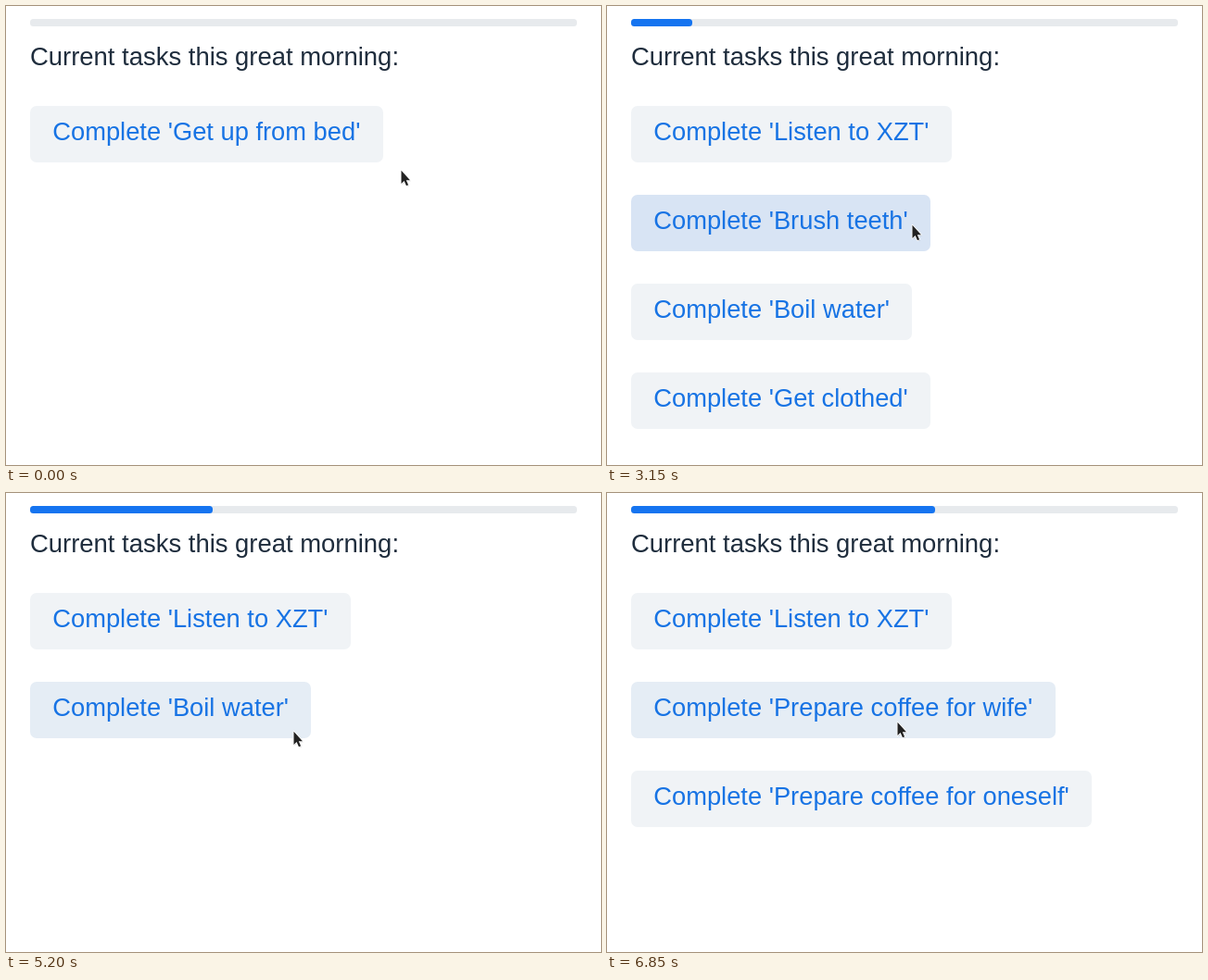
Recreate the animation shown at these times as an HTML page. Size 642 by 496 pixels, loop 8000 ms.

```html
<!DOCTYPE html>
<html lang="en">
<head>
<meta charset="utf-8">
<title>Morning tasks</title>
<style>
  html, body { margin: 0; width: 100%; height: 100%; overflow: hidden; background: #fff; }
  svg { display: block; width: 642px; height: 496px; }
  text { font: 27.3px "Liberation Sans", Arial, sans-serif; fill: #1773e4; }
  #heading { font-size: 27.45px; fill: #1f2d3d; }
</style>
</head>
<body>
<svg viewBox="0 0 642 496">
  <rect x="26" y="14" width="590" height="8" rx="3.5" fill="#e7eaed"/>
  <rect id="bar" x="26" y="14" height="8" rx="3.5" fill="#1574f0"/>
  <text id="heading" x="26" y="64">Current tasks this great morning:</text>
  <g id="list"></g>
  <g id="cursor">
    <path d="M.5 1V15L3.7 12L6 17.2L8.2 16.2L6 11.2H10Z" fill="#000" opacity=".16"/>
    <path d="M-.5 -.2V14L2.6 11L5 16.2L7.1 15.2L4.8 10.2H9Z" fill="#222" stroke="#fff" stroke-width="1.6" stroke-linejoin="round" paint-order="stroke"/>
  </g>
</svg>
<script>
const LOOP = 8000, TICK = 50, FADE = 250, BAR_TIME = 150;
const LEFT = 26, TOP = 108, PITCH = 96, HEIGHT = 61, PADDING = 24.3;
const IDLE = '#f0f3f6', HOVER = '#e5edf5', PRESSED = '#d8e4f4';

// Completing a task puts its followers in its place
const FOLLOWERS = {
  'Get up from bed': ['Listen to XZT', 'Brush teeth', 'Boil water', 'Get clothed'],
  'Boil water': ['Brew coffee'],
  'Brew coffee': ['Prepare coffee for wife', 'Prepare coffee for oneself']
};
const TASK_COUNT = 9;

const CLICKS = [
  { press: 1550, release: 1560 },
  { press: 3150, release: 3250 },
  { press: 4450, release: 4500 },
  { press: 5400, release: 5500 },
  { press: 6450, release: 6550 }
];

const HOME = { x: 427, y: 178 };
const MOVES = [
  { at: 450, time: 430, x: 381, y: 155 },
  { at: 2500, time: 300, x: 330, y: 237 },
  { at: 3750, time: 250, x: 353, y: 313 },
  { at: 4100, time: 200, x: 336, y: 331 },
  { at: 4900, time: 180, x: 315, y: 246 },
  { at: 5080, time: 120, x: 311, y: 258 },
  { at: 5200, time: 70, x: 314, y: 248 }
];

const $ = id => document.getElementById(id);
const clamp = v => Math.min(1, Math.max(0, v));
const easeOut = k => 1 - (1 - k) ** 3;
const easeInOut = k => k * k * (3 - 2 * k);

function add(parent, name, attrs) {
  const node = document.createElementNS('http://www.w3.org/2000/svg', name);
  for (const key in attrs) node.setAttribute(key, attrs[key]);
  return parent.appendChild(node);
}

function makeButton(task) {
  const group = add($('list'), 'g', {});
  const box = add(group, 'rect', { height: HEIGHT, rx: 7 });
  const label = add(group, 'text', { x: PADDING, y: 37 });
  label.textContent = `Complete '${task}'`;
  const width = Math.round(label.getComputedTextLength() + 2 * PADDING);
  box.setAttribute('width', width);
  return { group, box, width };
}

const buttons = {};
for (const task of new Set(Object.entries(FOLLOWERS).flat(2))) buttons[task] = makeButton(task);

function pointer(t) {
  return MOVES.reduce((from, to) => {
    const k = easeInOut(clamp((t - to.at) / to.time));
    return { x: from.x + (to.x - from.x) * k, y: from.y + (to.y - from.y) * k };
  }, HOME);
}

function taskUnder({ x, y }, tasks) {
  return tasks.find((task, row) => {
    const top = TOP + PITCH * row;
    return x >= LEFT && x < LEFT + buttons[task].width && y >= top && y < top + HEIGHT;
  });
}

// The list shown after each click
const states = [{ since: 0, tasks: ['Get up from bed'] }];
for (const { press, release } of CLICKS) {
  const { tasks } = states[states.length - 1];
  const clicked = taskUnder(pointer(press), tasks);
  states.push({
    since: release,
    tasks: tasks.flatMap(task => task === clicked ? FOLLOWERS[task] ?? [] : task)
  });
}

function hoverAmount(task, { since, tasks }, t) {
  let age = 0;
  while (age < FADE && t - age >= since && taskUnder(pointer(t - age), tasks) === task) age += TICK;
  return easeOut(age / FADE);
}

function draw(t) {
  const done = states.filter(s => s.since <= t).length - 1;
  const state = states[done];
  const pressed = CLICKS.some(c => t >= c.press && t < c.release);
  const { x, y } = pointer(t);
  const hovered = taskUnder({ x, y }, state.tasks);
  const progress = done && done - 1 + clamp((t - state.since) / BAR_TIME);

  $('bar').setAttribute('width', Math.round(590 * progress / TASK_COUNT));
  $('cursor').setAttribute('transform', `translate(${Math.round(x)} ${Math.round(y)})`);

  for (const task in buttons) {
    const { group, box } = buttons[task];
    const row = state.tasks.indexOf(task);
    group.style.display = row < 0 ? 'none' : '';
    if (row < 0) continue;
    group.setAttribute('transform', `translate(${LEFT} ${TOP + PITCH * row})`);
    box.style.fill = pressed && task === hovered
      ? PRESSED
      : `color-mix(in srgb, ${HOVER} ${100 * hoverAmount(task, state, t)}%, ${IDLE})`;
  }
}

let start;
function frame(now) {
  start ??= now;
  const t = (now - start) % LOOP;
  draw(Math.floor(t / TICK) * TICK);
  requestAnimationFrame(frame);
}
draw(0);
requestAnimationFrame(frame);
</script>
</body>
</html>
```
